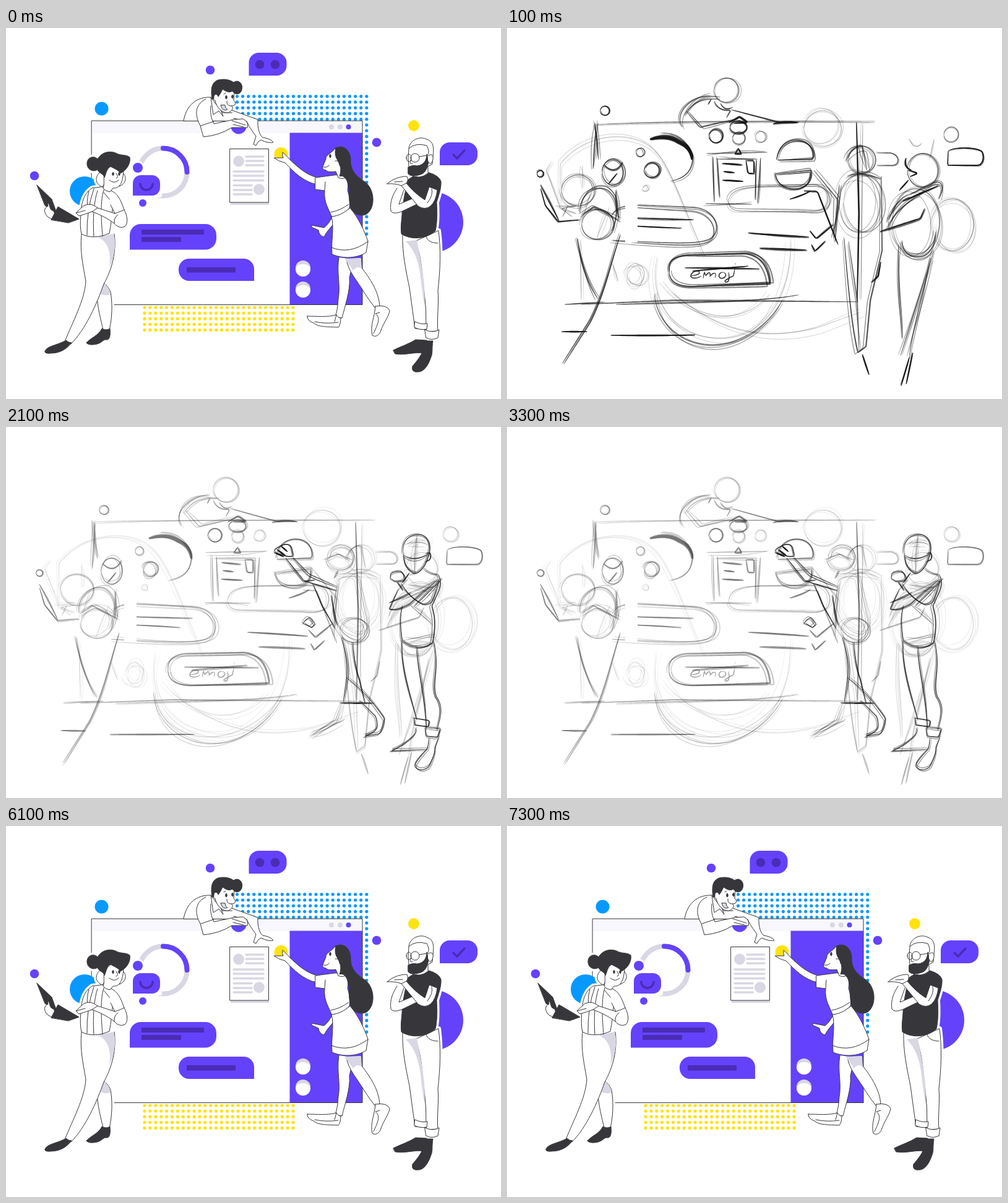
An HTML page with a canvas that plays this animation: 800 by 600 pixels, repeating every 8100 ms.

```html
<!DOCTYPE html>
<html lang="en">
<head>
<meta charset="utf-8">
<title>From sketch to illustration</title>
<style>
html, body { margin: 0; width: 100%; height: 100%; overflow: hidden; background: #fff; }
canvas { display: block; }
svg { position: absolute; }
</style>
</head>
<body>
<canvas id="stage" width="800" height="600"></canvas>
<svg width="0" height="0"><path id="probe"/></svg>
<script>
const ctx = document.getElementById('stage').getContext('2d');
const probe = document.getElementById('probe');
const WHITE = '#fff', DARK = '#37373b', GREY = '#d9d7e3', PURPLE = '#6442fc',
      DEEP = '#4a2cb5', BLUE = '#0799ff', YELLOW = '#ffe30f', LINE = '#38383c';
ctx.lineCap = ctx.lineJoin = 'round';

let seed = 1;
const rand = () => (seed = seed * 16807 % 2147483647) / 2147483647 - .5;
const oval = (x, y, rx, ry = rx) =>
  `M${x - rx} ${y}a${rx} ${ry} 0 1 1 ${2 * rx} 0a${rx} ${ry} 0 1 1 ${-2 * rx} 0Z`;

function fill(d, color) {
  ctx.fillStyle = color;
  ctx.fill(new Path2D(d));
}
function stroke(d, color = LINE, width = 1) {
  ctx.strokeStyle = color;
  ctx.lineWidth = width;
  ctx.stroke(new Path2D(d));
}
function rect(x, y, w, h, color) {
  ctx.fillStyle = color;
  ctx.fillRect(x, y, w, h);
}
function bubble(x, y, w, h, radii) {
  ctx.beginPath();
  ctx.roundRect(x, y, w, h, radii);
  ctx.fillStyle = PURPLE;
  ctx.fill();
}
function dots(x, y, cols, rows, dx, dy, color) {
  for (let i = 0; i < cols; i++)
    for (let j = 0; j < rows; j++) fill(oval(x + i * dx, y + j * dy, 2.6), color);
}

// Figures: each part is drawn by pen(path, fill); no fill means a bare line
function laptopWoman(pen) {
  pen('M149 408C143 436 152 466 157 488L167 489C172 466 172 445 169 427C166 419 162 416 157 411', WHITE);
  pen('M148 427C155 433 163 433 169 431C168 421 162 416 157 411Z', GREY);
  pen('M122 333C119 362 125 385 129 410C127 440 108 475 95 507L105 511C128 488 147 446 158 414C171 391 179 362 175 333', WHITE);
  pen('M148 338C164 345 171 362 167 387C177 366 178 346 174 333Z', GREY);
  pen('M63 523C65 514 84 513 97 505Q101 509 106 509C98 519 88 526 72 526Q62 527 63 523Z', DARK);
  pen('M130 509C137 501 150 497 155 486Q162 490 168 486C169 496 168 503 164 504Q159 503 155 507C149 513 132 514 130 509Z', DARK);
  pen('M50 254L74 277L83 302L63 287Z', DARK);
  pen('M68 288C60 291 62 299 66 304C71 309 78 310 82 309L77 296C69 294 72 287 68 283', WHITE);
  pen('M73 310L84 289L118 309L101 315Z', DARK);
  pen('M139 259C128 266 122 278 121 300Q119 322 122 333C134 340 152 339 167 332Q171 314 174 268L156 257Z', WHITE);
  pen('M142 260Q130 294 131 335M148 263C142 280 140 310 142 337M158 262C151 283 155 322 156 337M158 266L177 289M134 264Q129 280 133 299');
  pen('M165 262C181 264 186 281 191 294C196 303 198 316 192 321C184 325 177 319 175 316C166 309 151 301 139 297Q128 301 118 304L113 299L126 287Q138 282 148 291L176 300L169 286', WHITE);
  pen('M176 300Q190 295 191 294M148 291L139 297M114 299L128 295M175 316Q174 307 181 302');
  pen('M151 234C144 241 143 252 156 257Q162 250 159 236ZM186 232C195 237 197 251 183 256Z', WHITE);
  pen('M160 225C157 238 159 249 158 255Q154 262 168 265L173 259C187 260 190 243 190 225', WHITE);
  pen('M148 229C141 234 130 229 131 218C132 208 143 206 148 212C154 201 167 198 177 202C185 207 194 204 200 209C202 219 195 230 185 235C181 229 174 227 169 224C162 228 162 236 159 242C158 235 149 235 148 229Z', DARK);
  pen(oval(173, 236, 1.2, 2.6), DARK);
  pen(oval(183, 236, 1.2, 2.6), DARK);
  pen('M178 235Q183 242 178 243M167 246Q175 253 182 246');
}

function leaningMan(pen) {
  pen('M287 150C291 127 306 111 331 112L350 137L372 137V150Z', WHITE);
  pen('M365 133L407 148C406 164 411 175 415 177Q428 179 432 185Q424 187 412 181Q407 183 404 190L400 188L404 175C398 167 392 158 389 151L368 146', WHITE);
  pen('M323 115C309 121 302 136 314 158L319 176Q344 174 365 161L390 161Q393 152 383 147L368 148L336 155C331 145 330 137 331 126', WHITE);
  pen('M315 158L336 151M365 150L387 157M367 156L384 160M331 112L335 140L344 134L351 143L347 132');
  pen('M338 107C332 105 331 115 338 117C340 129 350 138 359 137C368 133 367 127 364 126C373 126 371 120 368 117L369 101L352 94Z', WHITE);
  pen('M333 115C331 101 331 88 343 84C352 82 361 83 368 88C376 82 384 91 381 100C379 108 370 109 366 102C359 106 354 101 350 99Q347 106 343 111C341 105 335 106 336 114Z', DARK);
  pen(oval(356, 112, 1.2, 3), DARK);
  pen(oval(366, 111, 1.2, 3), DARK);
  pen('M357 118Q356 126 364 126M352 107L355 105');
  pen('M347 125Q350 136 358 132Q354 130 354 125Z', GREY);
  pen('M347 125Q350 136 358 132Q354 130 354 125Z');
}

function reachingWoman(pen) {
  pen('M538 371C534 396 541 416 537 438Q536 456 532 467L543 469C547 452 557 424 555 404L562 374', WHITE);
  pen('M550 373C552 393 569 410 579 428Q588 442 596 452L604 449C602 425 588 405 575 388L574 372', WHITE);
  pen('M547 373H574L575 389Q567 384 561 392Z', GREY);
  pen('M487 466C502 466 519 468 534 464Q539 471 541 468Q541 480 537 484C519 483 505 484 497 477Q486 473 487 466Z', WHITE);
  pen('M597 450C596 467 588 481 592 497C598 501 604 496 606 489C610 477 619 466 620 457Q616 447 597 450Z', WHITE);
  pen('M499 475Q518 479 537 476M604 460L597 462C607 469 599 483 594 494M534 464L531 475');
  pen('M527 306C523 314 518 320 514 323L494 319V322L505 327Q506 336 514 338C518 329 525 323 528 318', WHITE);
  pen('M500 241C485 237 470 224 458 212Q451 204 447 201Q446 207 448 210L433 210Q441 216 451 218C464 232 481 249 502 253', WHITE);
  pen('M500 242L530 238C548 236 555 247 552 262Q557 279 555 291C547 300 537 305 526 305C523 294 513 283 515 263L500 261Z', WHITE);
  pen('M526 305C538 304 548 298 556 291C570 307 580 330 585 345L582 363C568 372 546 374 527 366C525 344 531 323 526 305Z', WHITE);
  pen('M525 298Q541 295 554 285M526 355Q556 367 585 345M515 263L516 249');
  pen('M532 195C524 204 516 206 517 212L512 224Q510 229 517 230Q520 234 533 232L537 242Q546 246 550 240L545 210Z', WHITE);
  pen('M533 194C546 188 556 198 557 212C556 230 566 240 579 248C595 259 597 285 587 297C580 306 567 304 560 296C551 284 558 264 551 246Q545 237 539 240C543 228 540 222 536 214Q530 206 533 194Z', DARK);
  pen(oval(524, 207, 1.2, 2.8), DARK);
  pen('M513 225Q520 226 522 222M532 215Q539 213 539 222');
}

function beardedMan(pen) {
  pen('M641 333C640 365 647 395 652 420L661 486L681 488C682 465 676 440 677 418L670 345', WHITE);
  pen('M662 345C671 369 672 392 675 418Q680 455 679 491L698 490C696 472 700 445 698 425C702 391 703 357 699 328Z', WHITE);
  pen('M646 345C666 365 669 390 672 420L676 450C679 420 673 390 664 343Z', GREY);
  pen('M626 521C638 515 651 511 662 504L680 505L681 514Q676 520 675 526C661 523 646 530 629 527Z', DARK);
  pen('M657 547C665 537 674 528 679 506H690C688 518 690 525 687 532C682 547 675 555 668 556Q654 558 657 547Z', DARK);
  pen('M661 475Q671 480 681 478L680 487Q668 489 660 484ZM677 488Q690 494 700 488L698 501Q688 506 679 501Z', WHITE);
  pen('M679 332Q677 347 698 348');
  pen('M649 246C660 237 672 235 684 234Q700 239 703 248C704 260 698 274 696 282C697 299 697 315 694 328C679 342 654 343 639 333C637 318 641 306 640 293Z', DARK);
  pen('M632 259C625 270 620 281 622 296Q626 302 639 297L666 284L659 275L635 285L643 262', WHITE);
  pen('M616 252C624 245 635 240 648 240Q651 246 647 251C656 262 667 272 677 278L684 257L697 262Q695 280 686 288Q677 295 666 288L639 255Q629 251 616 252Z', WHITE);
  pen('M688 260Q691 270 681 283M628 249L641 248M639 255L647 251');
  pen('M651 195C652 181 669 174 680 180C691 183 692 194 690 207L689 220L682 224V235Q668 246 652 237L650 211Z', WHITE);
  pen('M650 225Q657 221 664 223C675 222 680 214 680 204L683 216C681 228 677 235 670 237Q656 242 650 236Z', DARK);
  pen('M682 207C690 200 693 211 687 219Q683 220 682 215', WHITE);
  pen(oval(661, 210, 7));
  pen(oval(651, 210, 4, 6));
  pen('M668 208L681 206M651 195Q661 185 680 190Q686 201 681 206M655 213Q650 222 657 219');
}

const people = pen => [leaningMan, reachingWoman, laptopWoman, beardedMan].forEach(f => f(pen));

function inkPen(d, color) {
  if (color) fill(d, color);
  if (color !== GREY) stroke(d);
}
function halo(figure) {
  figure((d, color) => color && color !== GREY && stroke(d, WHITE, 8));
}

function illustration() {
  dots(373.5, 110.5, 24, 25, 9.1, 9.27, BLUE);
  dots(224, 452, 28, 5, 8.89, 9.1, YELLOW);
  rect(138.5, 150, 437.5, 297.5, WHITE);
  rect(139, 150, 437, 20, '#f8f7fd');
  rect(458.5, 169.5, 117.5, 278, PURPLE);
  stroke('M138.5 150H576V447.5H138.5Z');
  [526, 540, 553.5].forEach((x, i) => fill(oval(x, 160, 4), i < 2 ? GREY : PURPLE));
  for (const y of [388, 422]) {
    fill(oval(480, y, 12), GREY);
    fill(`M468 ${y + 2}C470 ${y - 9} 490 ${y - 9} 492 ${y + 2}A12 12 0 0 1 468 ${y + 2}Z`, WHITE);
  }

  stroke(oval(254, 233, 38.5), GREY, 8);
  stroke('M254 194.5A38.5 38.5 0 0 1 292.5 233', PURPLE, 8);
  stroke('M205 238H249V271H205Z', WHITE, 6);
  stroke(oval(213, 226, 8), WHITE, 6);
  bubble(205, 238, 44, 33, [13, 13, 13, 0]);
  stroke('M217 252A10 10 0 0 0 237 252', DEEP, 3.5);

  rect(363, 282, 62, 4, GREY);
  rect(362, 195.5, 62.5, 86.5, WHITE);
  stroke('M362 195.5H424.5V282H362Z');
  fill(oval(376, 215.5, 9), GREY);
  fill(oval(409, 261, 9), GREY);
  [208, 215, 222, 232, 239, 246.5, 254.5, 262, 269].forEach((y, i) =>
    stroke(`M${i < 3 ? 388 : 368} ${y}H${i < 6 ? 416 : 397}`, GREY, 3.4));

  bubble(200, 317, 140, 41.5, [18, 18, 18, 0]);
  rect(219, 326, 101, 8, DEEP);
  rect(219, 338, 64, 8, DEEP);
  bubble(279, 373, 122, 36, [17, 17, 0, 17]);
  rect(292, 387, 79, 8.5, DEEP);
  bubble(392.5, 40, 61, 37, [16, 16, 16, 0]);
  fill(oval(410, 59, 7.3), DEEP);
  fill(oval(435, 59, 7.3), DEEP);
  bubble(701, 185, 61, 37, [16, 16, 16, 0]);
  stroke('M723 205L729 211L741 198', DEEP, 3.5);

  const disc = (color, x, y, r) => fill(oval(x, y, r), color);
  disc(PURPLE, 213, 226, 8);
  disc(PURPLE, 221, 283, 6);
  disc(PURPLE, 46, 239, 7.3);
  disc(PURPLE, 330, 68, 7.3);
  disc(PURPLE, 599, 185, 7.3);
  disc(PURPLE, 376, 159, 12.5);
  disc(PURPLE, 690, 314, 49);
  disc(BLUE, 154.5, 130.5, 11);
  disc(BLUE, 127, 264, 24);
  disc(YELLOW, 659, 158, 9);
  disc(YELLOW, 444.5, 204, 11);

  halo(laptopWoman);
  halo(beardedMan);
  people(inkPen);
}

function samplePath(d) {
  probe.setAttribute('d', d);
  const length = probe.getTotalLength(), n = Math.max(2, Math.ceil(length / 4));
  return Array.from({ length: n + 1 }, (_, i) => probe.getPointAtLength(length * i / n));
}

// Tapered stroke whose start, middle and end drift apart from the given points
function ribbon(points, width, drift) {
  const n = points.length - 1, reach = drift * Math.min(1, n / 12);
  const [ax, ay, bx, by, cx, cy] = Array.from({ length: 6 }, () => rand() * reach);
  const moved = points.map(({ x, y }, i) => {
    const u = i / n, bend = Math.sin(Math.PI * u);
    return { x: x + ax * (1 - u) + bx * u + cx * bend, y: y + ay * (1 - u) + by * u + cy * bend };
  });
  const left = [], right = [];
  moved.forEach(({ x, y }, i) => {
    const p = moved[Math.max(i - 1, 0)], q = moved[Math.min(i + 1, n)];
    const half = width / 2 * (.35 + .65 * Math.sqrt(Math.abs(Math.sin(Math.PI * i / n))));
    const k = half / (Math.hypot(q.x - p.x, q.y - p.y) || 1);
    const nx = (p.y - q.y) * k, ny = (q.x - p.x) * k;
    left.push([x + nx, y + ny]);
    right.unshift([x - nx, y - ny]);
  });
  ctx.beginPath();
  [...left, ...right].forEach(p => ctx.lineTo(...p));
  ctx.fill();
}

// Pencil line: one faithful stroke plus a few that stray from it
let fade = 1;
function pencil(d, width = 1.6, alpha = .65, copies = 2, drift = 4) {
  ctx.fillStyle = '#111';
  for (const part of d.match(/M[^M]+/g)) {
    const points = samplePath(part);
    for (let i = 0; i < copies; i++) {
      ctx.globalAlpha = alpha * fade * (i ? .7 : 1);
      ribbon(points, width * (i ? .8 : 1), i && drift);
    }
  }
  ctx.globalAlpha = 1;
}
const bold = (d, width = 2.4) => pencil(d, width, .9, 2, 3);
const loose = (d, copies = 4) => pencil(d, 1.9, .62, copies, 9);
const faint = (d, copies = 2, drift = 9) => pencil(d, 1.3, .26, copies, drift);

function layout() {
  // window, floor and big construction curves
  loose('M142 153L148 213M144 155L139 228');
  pencil('M145 156C250 150 480 150 595 151', 1.5, .5, 3, 6);
  bold('M565 153L569 300L566 442', 2.4);
  pencil('M575 155L572 440', 1.3, .5, 2, 6);
  pencil('M120 447L270 441L567 443M93 447L158 443M176 447C300 442 400 444 470 432', 1.6, .7, 2, 4);
  bold('M88 491H129M168 497H304');
  faint('M86 290V220C130 165 210 165 240 200C265 225 285 290 320 370', 3);
  pencil('M238 430C242 482 290 516 340 512C385 508 425 478 445 440', 1.7, .55, 4, 14);
  faint('M243 370C225 450 280 504 350 502C420 498 462 430 458 340', 4, 18);
  faint('M270 430C330 480 400 510 500 485L570 460M252 410C300 475 380 485 425 430', 3, 14);

  // round marks
  bold(oval(158, 134, 7.5), 1.7);
  bold(oval(54, 236, 5.5), 2);
  pencil(oval(216, 201, 7), 1.7, .7);
  pencil(oval(234, 230, 12), 2, .7, 4, 6);
  faint(oval(224, 260, 5), 3);
  pencil(oval(338, 175, 11), 2, .8, 3);
  pencil(oval(375, 178, 10), 1.6, .5, 3);
  pencil(oval(374, 160, 14, 10), 2, .8, 3);
  pencil(oval(410, 176, 9), 1.4, .4, 3);
  faint(oval(510, 163, 30, 29), 5);
  faint(oval(208, 398, 14, 17), 6, 14);
  pencil(oval(718, 173, 12), 1.4, .45, 3);
  faint(oval(720, 318, 34, 42), 6, 16);
  pencil(oval(115, 263, 27, 25), 1.5, .45, 4, 8);
  bold('M231 180Q260 171 278 184Q298 192 299 213', 7);
  pencil('M250 170Q285 168 300 205Q302 241 264 248', 1.8, .6, 3, 7);

  // document and speech shapes
  pencil('M340 210L344 275M333 208L335 282M410 210L405 284M403 212L401 278', 1.9, .7, 2, 5);
  loose('M338 212H405M320 284L396 285M322 203L421 201', 2);
  bold('M368 204L374 195L379 204Z');
  bold('M348 219L380 222M350 232L368 234M348 246L382 248', 2.8);
  bold('M386 214H399V235H389Z', 2);
  pencil('M436 213C438 190 455 178 475 182C490 185 497 200 494 212L438 214M434 236L492 230C495 250 480 262 460 260C440 258 435 245 434 236Z', 2.2, .7, 4, 6);
  bold('M457 277Q478 271 491 263');
  pencil('M358 280C360 262 380 258 410 257L500 256C520 258 525 275 520 288C515 300 500 300 480 298L380 296C362 296 358 288 358 280Z', 1.7, .45, 4, 8);
  loose('M170 302C175 290 190 287 210 286L300 290C335 292 345 320 335 335C325 350 290 350 170 343');
  bold('M202 307L302 310M202 320L282 324', 2);
  bold('M390 332L488 338M408 356L484 359', 2.8);
  bold('M489 328L500 341L528 318M492 350L498 361L515 345');
  pencil('M262 395C258 375 275 366 300 367L385 365C410 368 422 385 425 414L300 418C275 418 263 410 262 395Z', 2.7, .75, 4, 8);
  bold('M288 388L408 390M300 393L390 385', 2.2);
  pencil('M296 401C305 400 314 398 311 394C304 391 296 396 297 403Q305 407 314 401M317 405L319 394L321 401C327 392 330 395 328 402C335 392 340 396 336 404M350 395C341 394 340 405 347 405C356 404 355 396 350 395M358 395C360 405 359 415 351 410Q358 404 366 401L368 390M369 381V382', 1.9, .85, 1);
  bold('M713 199C720 192 760 192 768 200C772 212 768 220 762 222H712Z', 2.1);
  pencil('M597 202H620C635 205 635 220 625 222H597', 1.6, .5, 3);

  // leaning and laptop figures as blocked shapes
  pencil(oval(355, 101, 20), 1.5, .42, 4, 5);
  loose('M284 160C268 140 297 108 330 110M287 140C300 120 315 113 345 115M290 135L312 161L370 147', 3);
  pencil('M335 118Q342 136 362 133L355 145M330 115L325 124M345 122Q352 136 365 128', 1.9, .65);
  pencil('M362 132L440 153L472 153', 2, .75);
  bold('M359 153L376 144L389 153L368 154M430 155Q448 150 470 153', 3);
  bold('M54 254L84 312M54 260L62 287L83 313L118 310', 1.9);
  pencil('M78 288H113L88 292L105 305M84 290L112 300M98 288L90 305', 1.3, .4, 2, 6);
  faint('M86 290L63 230L72 216M122 222V260', 3);
  pencil(oval(171, 233, 17, 21), 1.8, .65, 4, 7);
  pencil('M156 221Q174 239 187 217M164 252L178 235', 2, .7, 3);
  loose('M118 300C115 278 134 255 158 260C180 270 182 300 169 328M120 302L140 289L181 311M176 264L180 310');
  pencil(oval(147, 318, 26, 24), 1.6, .5, 4, 10);
  pencil('M114 340C120 390 135 420 147 438M183 335C166 385 158 430 134 477L92 543', 2.2, .7, 3, 8);
  faint('M118 345L120 440M170 380L180 410M135 265L122 310M165 290L145 340', 3);
  rect(191, 277, 20, 70, WHITE);
}

function blockedPair() {
  pencil(oval(574, 213, 22), 1.6, .5, 4, 8);
  loose('M548 215Q558 190 574 191L582 231M550 240Q575 230 604 245');
  pencil(oval(570, 284, 33, 47), 1.5, .42, 6, 18);
  bold('M480 264L502 265L535 350');
  loose('M496 230L535 278L530 346M537 253L528 340', 3);
  loose('M545 340C550 400 556 480 567 525L580 515L587 440L606 360L605 240', 3);
  loose('M552 345L566 440L569 522', 2);
  bold('M604 378L600 402L589 412M574 528L585 561');
  pencil(oval(672, 230, 25, 27), 1.6, .5, 4, 9);
  bold('M648 230L664 235L652 240M645 210Q641 226 654 230M634 263L649 246');
  bold('M603 329L668 308L675 292M640 280L697 255', 2.6);
  pencil(oval(661, 315, 38, 55), 1.5, .45, 5, 16);
  loose('M650 270L690 250Q712 245 698 277M638 345Q640 372 670 370Q690 365 693 330M617 310Q630 275 650 270M615 325Q628 290 672 268');
  loose('M633 350C631 420 640 470 639 502M685 372C670 440 655 490 650 533M690 360L636 530', 3);
  bold('M650 533L637 579M656 525L645 576');
  faint('M650 180Q660 200 670 186M690 180L684 210', 3);
}

function posedPair() {
  const line = d => pencil(d, 1.5, .72, 3, 5);
  const guide = d => pencil(d, 1.1, .38, 5, 11);
  guide(oval(541, 211, 22, 20));
  guide('M515 215L537 205L560 215M536 232L530 245');
  line('M437 205Q430 200 438 196L447 191Q460 187 462 196L465 209Q454 211 448 207L437 205M452 212L482 249L500 247M464 211L490 238L535 258M482 249L534 265');
  bold('M434 203L449 210M444 192L455 202M438 198L452 208');
  line('M497 255L511 290L532 325M525 272L535 320M480 318Q484 310 492 308L500 319L494 324Z');
  guide('M535 250L528 300Q538 340 570 345Q590 330 581 303L569 244Q548 236 535 250');
  guide(oval(562, 328, 22, 20));
  line('M542 340Q552 372 551 402L545 445M560 348Q563 385 572 410L580 448M550 405C570 420 590 440 612 472Q611 488 604 496L579 500Q600 492 600 485Q600 474 597 468L571 442');
  bold('M540 447H595', 1.8);
  guide('M543 445L533 473L490 500M545 475L496 498');
  line('M642 205C640 181 654 173 668 174C686 176 688 195 682 210C678 225 668 236 660 237C648 232 642 220 642 205ZM643 207Q660 219 684 205M678 205Q689 198 686 214L678 218');
  guide('M664 176L660 236M645 190Q664 183 681 190');
  line('M652 236L640 252M676 228Q686 238 698 238Q706 249 699 266L688 290Q697 315 689 350Q665 366 640 345Q635 310 641 290');
  line('M621 245Q620 236 627 235Q640 231 642 238Q647 245 641 249L629 250ZM638 253Q654 278 676 288Q689 287 692 275L700 248M632 251L642 265M634 262Q626 278 619 295Q632 298 652 287L697 247M620 284L655 267M660 290L705 245');
  guide('M655 290L690 320M644 345L692 335M650 355L690 350M650 255L690 260');
  line('M640 345C638 390 656 440 664 474M691 347C702 390 687 415 696 437C709 455 700 475 697 490M664 355C666 400 677 430 680 490');
  line('M659 471L684 475L682 485L660 482ZM677 486L702 488L697 502L679 500ZM662 487Q664 495 658 501Q644 515 622 524L682 521M683 503Q683 514 680 522Q664 538 660 548Q668 560 683 550Q694 530 693 518L700 500');
}

function roughPen(d, color) {
  if (color === GREY) return;
  if (color) fill(d, 'rgba(255,255,255,.7)');
  pencil(d, 1.6, .75, 2, 2.5);
}

function faded(amount, draw) {
  fade = amount;
  draw();
  fade = 1;
}

function roughPose() {
  faded(.45, layout);
  faded(.24, blockedPair);
  posedPair();
}

function cleanSketch() {
  rect(142, 152, 450, 294, '#f9f9f9');
  faded(.15, layout);
  faded(.09, blockedPair);
  faded(.12, posedPair);
  bold('M141 151H300M435 150H506M525 150H577V158', 1.8);
  pencil('M141 151V225M141 180V446M300 151H435', 1.4, .6, 1);
  bold('M170 447H418M437 446H592M593 160V446', 2);
  pencil('M486 480H533M565 497L623 499', 1.2, .4);
  const ring = (x, y, r) => pencil(oval(x, y, r), 1.7, .75, 2, 3);
  ring(158, 133, 9.5);
  ring(50, 241, 7);
  ring(217, 201, 9);
  ring(234, 228, 16);
  ring(223, 258, 7);
  ring(376, 160, 13);
  ring(445, 202, 11);
  ring(634, 189, 4.5);
  ring(696, 161, 9.5);
  pencil('M143 258A25 24 0 1 0 122 288', 1.4, .4);
  pencil('M713 271C770 273 770 355 705 358', 1.8, .7, 3, 6);
  people(roughPen);
  faint('M313 118L350 150M530 250L560 300M535 310L560 360M150 345L160 400M660 250L685 325M680 350L685 450', 5, 24);
}

const blocking = () => { layout(); blockedPair(); };
const scenes = [illustration, blocking, roughPose, cleanSketch];
const LOOP = 8100, INTRO = 100, HOLD = 2000;
let shown = -1;

function frame() {
  const t = performance.now() % LOOP;
  const index = t < INTRO ? 0 : (1 + Math.floor((t - INTRO) / HOLD)) % scenes.length;
  if (index !== shown) {
    shown = index;
    seed = 70001 + index;
    rect(0, 0, 800, 600, WHITE);
    scenes[index]();
  }
  requestAnimationFrame(frame);
}
frame();
</script>
</body>
</html>
```
